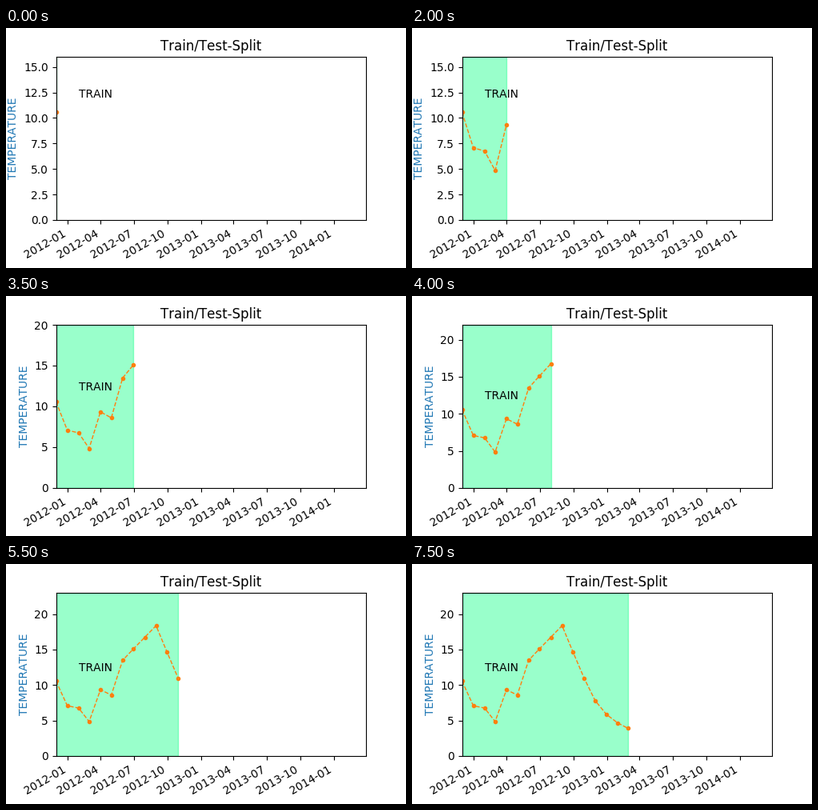
A matplotlib script that plays this animation: 500x300 px, repeating every 8000 ms.

```python
import numpy as np
import matplotlib.pyplot as plt
import matplotlib.dates as mdates
from matplotlib.animation import FuncAnimation

plt.rcParams["text.kerning_factor"] = 6

# Uneven start, steady summer rise, straight autumn fall, winter decay.
start = [10.56, 7.08, 6.76, 4.85, 9.33, 8.6]
summer = np.linspace(13.48, 18.37, 4)
autumn = np.linspace(summer[-1], 10.93, 3)[1:]
winter = 2.69 + 8.24 * 0.62 ** np.arange(1, 5)
temps = np.concatenate([start, summer, autumn, winter])

# Monthly means are stamped on the last day of each month.
months = np.datetime64("2011-12") + np.arange(len(temps))
days = mdates.date2num(months.astype("datetime64[D]") - np.timedelta64(1, "D"))
end = mdates.date2num(np.datetime64("2014-03-31"))

fig, ax = plt.subplots(figsize=(5, 3), dpi=100)
fig.subplots_adjust(bottom=0.2)
ax.set_title("Train/Test-Split")
ax.set_ylabel("TEMPERATURE", color="tab:blue")
ax.set_xlim(days[0] - 0.1, end)  # keeps the first dot off the pixel boundary
ax.xaxis.set_major_locator(mdates.MonthLocator(bymonth=(1, 4, 7, 10)))
ax.xaxis.set_major_formatter(mdates.DateFormatter("%Y-%m"))
plt.setp(ax.get_xticklabels(), rotation=30, ha="right")

band = ax.axvspan(days[0], days[0], color="springgreen", alpha=0.4)
line, = ax.plot([], [], "o--", color="tab:orange", lw=1, ms=3)
ax.text(days[2], 12, "TRAIN")
ax.autoscale(False)


def update(i):
    n = i + 1
    line.set_data(days[:n], temps[:n])
    band.set_width(days[i] - days[0])
    ax.set_ylim(0, round(temps[:n].max()) + 5)
    return line, band


anim = FuncAnimation(fig, update, frames=len(temps), interval=500,
                     repeat=True, repeat_delay=0)
plt.show()
```
